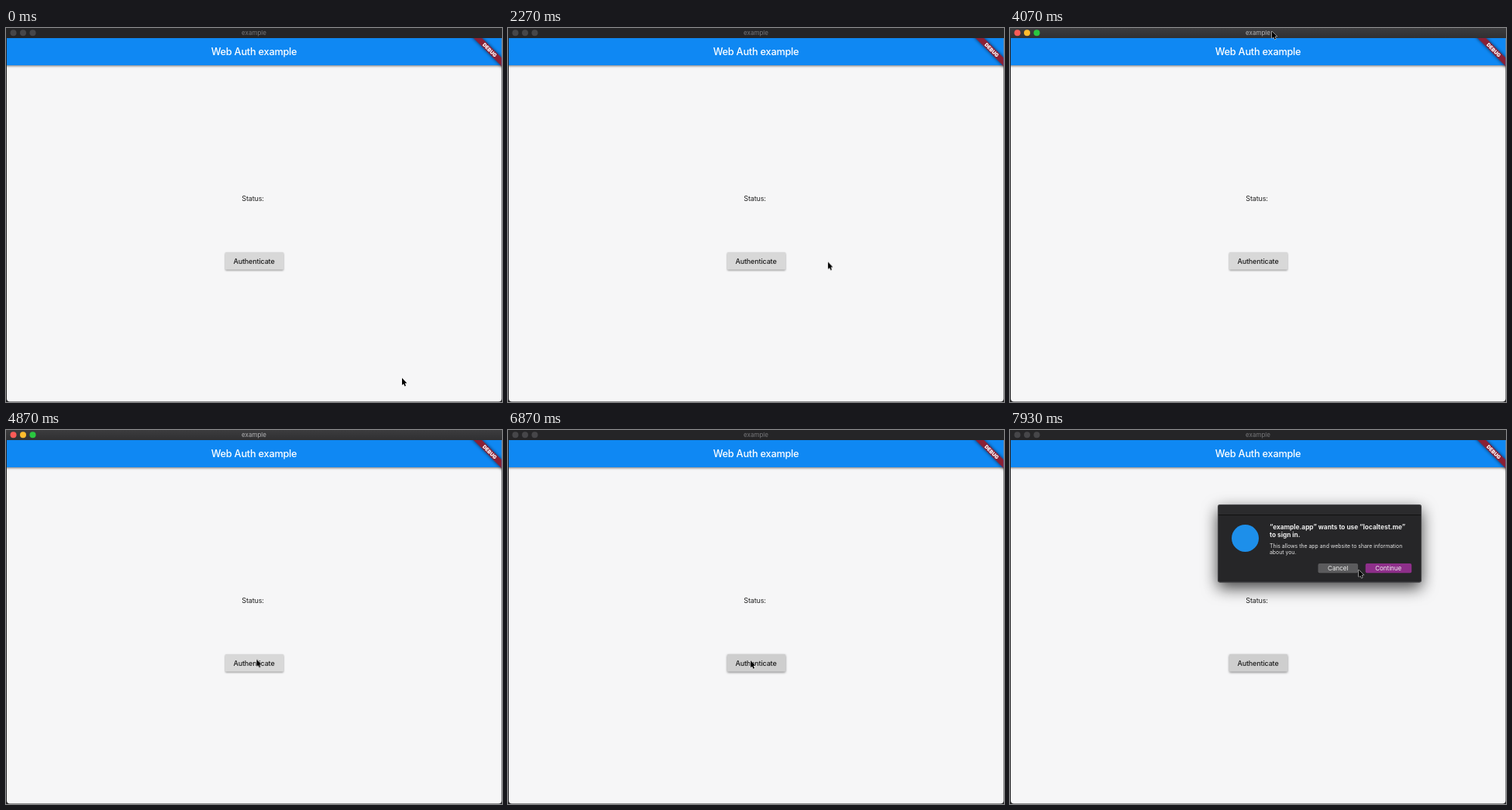
Write an HTML page that moves like this. It is 640 px wide and 482 px high and loops after 8000 ms.

```html
<!DOCTYPE html>
<html lang="en">
<head>
<meta charset="utf-8">
<title>Web Auth example</title>
<style>
  html, body { margin: 0; width: 100%; height: 100%; overflow: hidden; background: #222; }
  svg { display: block; width: 640px; height: 482px; font-family: Inter, Roboto, sans-serif; }
  .mid { text-anchor: middle; }

  .active, .button, .dialog, .cursor { animation: 8s linear infinite; }
  .active { animation-name: activate; }
  .button { animation-name: hover; }
  .dialog { animation-name: appear; }
  .cursor { animation-name: travel; }

  @keyframes activate {
    0%, 49.89% { opacity: 0; }
    49.9%, 85.78% { opacity: 1; }
    85.79%, 100% { opacity: 0; }
  }
  @keyframes hover {
    0%, 67.4% { fill: #d8d8d8; filter: drop-shadow(0 1px .8px #0006); }
    67.41%, 85.78% { fill: #c4c4c4; filter: drop-shadow(0 1.5px 1.6px #0007); }
    85.79%, 100% { fill: #cecece; filter: drop-shadow(0 1.5px 1.6px #0007); }
  }
  @keyframes appear {
    0% { opacity: 0; }
    86.56% { opacity: 0; animation-timing-function: steps(3, start); }
    89.06%, 100% { opacity: 1; }
  }
  /* Each move advances in discrete steps, then rests. */
  @keyframes travel {
    0% { transform: translate(511px, 451px); }
    .81% { transform: translate(511px, 451px); animation-timing-function: steps(2, start); }
    2.41% { transform: translate(505px, 300px); }
    10.79% { transform: translate(505px, 300px); animation-timing-function: steps(9, start); }
    18.29% { transform: translate(477px, 299px); }
    20.79% { transform: translate(477px, 299px); animation-timing-function: steps(12, start); }
    30.79% { transform: translate(400px, 302px); }
    31.54% { transform: translate(400px, 302px); animation-timing-function: steps(8, start); }
    38.2%, 40.78% { transform: translate(330px, 270px); }
    40.79% { transform: translate(327px, 260px); }
    41.6% { transform: translate(327px, 260px); animation-timing-function: steps(12, start); }
    51.6% { transform: translate(338px, 4px); }
    52.41% { transform: translate(338px, 4px); animation-timing-function: steps(12, start); }
    62.41% { transform: translate(322px, 322px); }
    65.79% { transform: translate(322px, 322px); animation-timing-function: steps(6, start); }
    70.79% { transform: translate(313px, 297px); }
    90.69% { transform: translate(313px, 297px); animation-timing-function: steps(11, start); }
    99.81%, 100% { transform: translate(450px, 180px); }
  }
</style>
</head>
<body>
<svg viewBox="0 0 640 482">
  <defs>
    <linearGradient id="bar" x2="0" y2="1">
      <stop stop-color="#3c3c3e"/>
      <stop offset="1" stop-color="#303032"/>
    </linearGradient>
    <clipPath id="content"><path d="M1 13H639.5V477.5a4 4 0 0 1-4 4H5a4 4 0 0 1-4-4Z"/></clipPath>
  </defs>

  <rect width="640" height="482" fill="#252527"/>

  <g clip-path="url(#content)">
    <rect y="13" width="640" height="469" fill="#f6f6f7"/>
    <rect x="-10" y="13" width="660" height="35" fill="#0f88f3" style="filter:drop-shadow(0 1.5px 1.5px #0008)"/>
    <text class="mid" x="320" y="35.2" font-size="12.7" font-weight="500" letter-spacing="-.2" fill="#fff">Web Auth example</text>

    <g transform="translate(639.5 13) rotate(45)">
      <rect x="-30" y="17.9" width="60" height="7.7" fill="#8b2035" style="filter:drop-shadow(0 0 2px #000a)"/>
      <text class="mid" y="24.1" font-size="6.5" font-weight="900" fill="#fff">DEBUG</text>
    </g>

    <text class="mid" x="318.5" y="223.4" font-size="9" letter-spacing="-.15" fill="#202020">Status:</text>
    <rect class="button" x="283" y="289" width="75" height="22.5" rx="1.3"/>
    <text class="mid" x="320" y="303.6" font-size="9" font-weight="500" letter-spacing="-.15" fill="#1c1c1c">Authenticate</text>
  </g>

  <g fill="#464649">
    <circle cx="9.5" cy="6.2" r="4"/>
    <circle cx="22" cy="6.2" r="4"/>
    <circle cx="34.5" cy="6.2" r="4"/>
  </g>
  <text class="mid" x="320" y="9.4" font-size="8" fill="#77777a">example</text>

  <g class="active">
    <rect width="640" height="13" fill="url(#bar)"/>
    <circle cx="9.5" cy="6.2" r="4" fill="#fc5b57"/>
    <circle cx="22" cy="6.2" r="4" fill="#fdbc2e"/>
    <circle cx="34.5" cy="6.2" r="4" fill="#2ac740"/>
    <text class="mid" x="320" y="9.4" font-size="8" fill="#b4b4b6">example</text>
  </g>

  <g class="dialog">
    <rect x="268" y="96" width="263" height="100.5" rx="3" fill="#262628" style="filter:drop-shadow(0 7px 10px #000b)"/>
    <path d="M268.5 109.5V99a2.5 2.5 0 0 1 2.5-2.5H528a2.5 2.5 0 0 1 2.5 2.5V109.5Z" fill="#2b2b2d"/>
    <path d="M268.5 109.5H530.5" stroke="#111"/>
    <rect x="268.4" y="96.4" width="262.2" height="99.7" rx="2.7" fill="none" stroke="#5a5a5c" stroke-width=".7"/>
    <circle cx="303.5" cy="139.5" r="17.5" fill="#1d8fea"/>
    <g font-size="8.3" font-weight="700" fill="#ececec">
      <text x="335" y="128.2">“example.app” wants to use “localtest.me”</text>
      <text x="335" y="138.2">to sign in.</text>
    </g>
    <g font-size="6.9" fill="#e4e4e4">
      <text x="335" y="151.6">This allows the app and website to share information</text>
      <text x="335" y="160.4">about you.</text>
    </g>
    <rect x="397.5" y="172" width="51.5" height="12.3" rx="2" fill="#5b5b5d"/>
    <rect x="458.7" y="172" width="59.5" height="12.3" rx="2" fill="#8e2f8a"/>
    <g class="mid" font-size="8" fill="#f0f0f0">
      <text x="423.2" y="181.2">Cancel</text>
      <text x="488.2" y="181.2">Continue</text>
    </g>
  </g>

  <path class="cursor" d="M0 0V9.2L2 7.4 3.5 10.8 5 10.1 3.6 6.8H6.4Z" fill="#000" stroke="#fff" stroke-width="1" stroke-linejoin="round" paint-order="stroke"/>
</svg>
</body>
</html>
```
